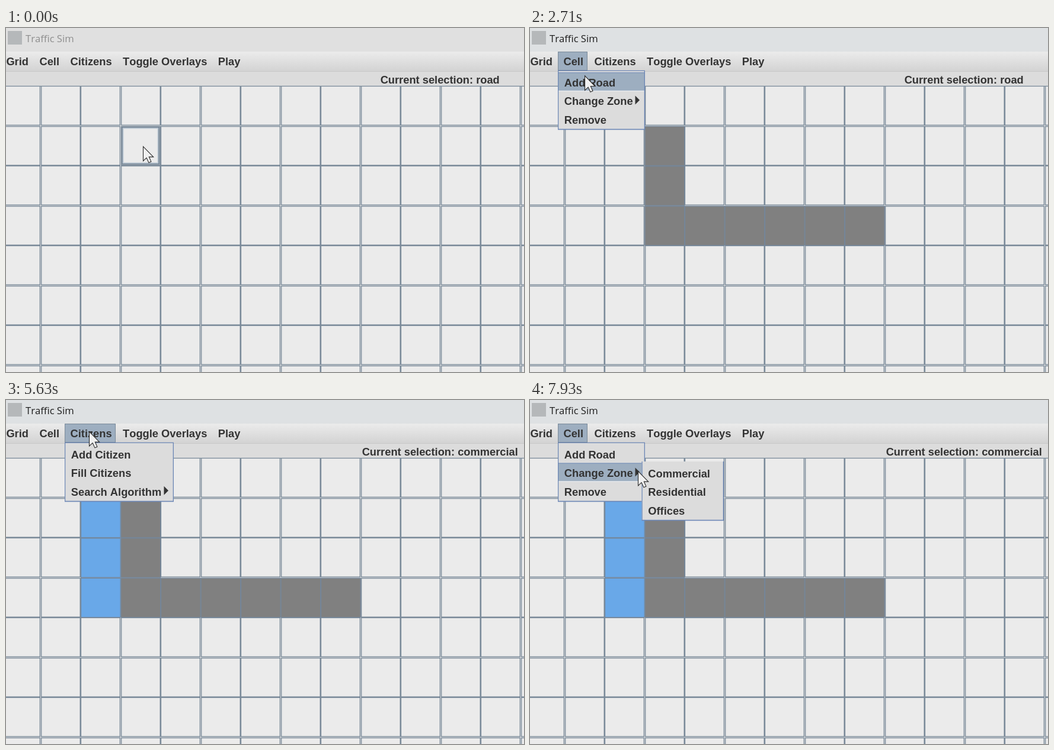
Write an HTML page with a canvas that moves like this. It is 874x582 px and loops after 8 s.

```html
<!DOCTYPE html>
<html lang="en">
<head>
<meta charset="utf-8">
<title>Traffic Sim</title>
<style>
html, body { margin: 0; width: 874px; height: 582px; overflow: hidden; }
canvas { display: block; }
</style>
</head>
<body>
<canvas id="stage" width="874" height="582"></canvas>
<script>
const ctx = document.getElementById('stage').getContext('2d');
const LOOP = 8000, PITCH = 67.5, LEFT = -9.5, TOP = 97.5, ROW = 31.4;
const LINE = '#7a8a99', EMPTY = '#ebebeb', ROAD = '#808080', SHOP = '#69a8e8';
const PANEL = '#dcdcdc', PICKED = '#9daec0', EDGE = '#6b86b5', INK = '#333';
const FOCUS = 200, CHOSEN = 4070;

// Pointer moves: start, end, x, y; it rests in between
const moves = [
  [0, 0, 231, 200], [130, 820, 222, 340], [820, 1570, 541, 338], [1700, 2400, 70, 52],
  [2570, 2710, 92, 80], [2710, 2850, 95, 115], [3110, 3600, 310, 128], [3600, 4000, 237, 118],
  [CHOSEN, 4400, 162, 200], [4400, 4880, 158, 318], [4880, 5030, 157, 290], [5030, 5370, 140, 53],
  [5760, 6000, 230, 155], [6000, 6230, 101, 55], [6500, 7260, 78, 74], [7330, 7930, 182, 120]
];
// Dragging paints every cell the pointer enters
const drags = [{ from: 130, to: 1600, color: ROAD }, { from: 4400, to: 4920, color: SHOP }];

const cellMenu = { x: 47, y: 72, w: 147, head: 50, arrow: 1, items: ['Add Road', 'Change Zone', 'Remove'] };
const citizenMenu = { x: 99, y: 72, w: 184, head: 86, arrow: 2, items: ['Add Citizen', 'Fill Citizens', 'Search Algorithm'] };
const zoneMenu = { x: 188.5, y: 104, w: 138.5, items: ['Commercial', 'Residential', 'Offices'] };
const menus = [[0, null], [2400, cellMenu], [CHOSEN, null], [5630, citizenMenu], [6560, cellMenu]];
const zoneShown = t => t >= 3200 && t < CHOSEN || t >= 7650;

const easeOut = k => Math.sin(k * Math.PI / 2);
const colX = c => PITCH * c + LEFT;
const rowY = r => PITCH * r + TOP;
const cellAt = ([x, y]) => [Math.floor((x - LEFT) / PITCH), Math.floor((y - TOP) / PITCH)];

function pointer(t) {
  let pos = moves[0].slice(2);
  for (const [from, to, x, y] of moves.slice(1)) {
    if (t < from) break;
    const k = easeOut(Math.min(1, (t - from) / (to - from)));
    pos = [pos[0] + (x - pos[0]) * k, pos[1] + (y - pos[1]) * k];
  }
  return pos;
}

const paints = new Map();
for (const { from, to, color } of drags) {
  for (let t = from; t < to; t += 10) {
    const [c, r] = cellAt(pointer(t)), key = c + ',' + r;
    if (!paints.has(key)) paints.set(key, { t, c, r, color });
  }
}

function rect(x, y, w, h, fill) {
  ctx.fillStyle = fill;
  ctx.fillRect(x, y, w, h);
}

function frame(x, y, w, h, color, width) {
  ctx.strokeStyle = color;
  ctx.lineWidth = width;
  ctx.strokeRect(x, y, w, h);
}

function shape(path, fill) {
  ctx.fillStyle = fill;
  ctx.fill(path);
}

function text(s, x, y, color = INK, font = 'bold 18.3px "Liberation Sans", Arial, sans-serif') {
  ctx.font = font;
  ctx.fillStyle = color;
  ctx.fillText(s, x, y);
}

function drawHeader(t) {
  const focused = t >= FOCUS;
  rect(0, 0, 874, 40, focused ? '#dee1e3' : '#e0e0e0');
  rect(3, 5, 24, 23, '#b5b8ba');
  text('Traffic Sim', 33, 24, focused ? '#1c1c1c' : '#8e8e8e', '16.6px "Open Sans", "Noto Sans", sans-serif');
  const shade = ctx.createLinearGradient(0, 40, 0, 73);
  shade.addColorStop(0, '#ebebeb');
  shade.addColorStop(1, '#d3d3d3');
  rect(0, 40, 874, 33, shade);
  rect(0, 73, 874, 1, '#c8c8c8');
  rect(0, 74, 874, 24, PANEL);
  // The label is centred on its own column
  ctx.textAlign = 'center';
  text('Current selection: ' + (t < CHOSEN ? 'road' : 'commercial'), 732.2, 94);
  ctx.textAlign = 'left';
}

function drawGrid() {
  rect(0, 98, 874, 484, EMPTY);
  const gaps = [];
  const edge = (pos, upright) => {
    const bar = (p, w, color) => upright ? rect(p, 98, w, 484, color) : rect(0, p, 874, w, color);
    if (pos % 1) return bar(pos - 1, 2.6, LINE);
    bar(pos - 1.3, 3.6, LINE);
    gaps.push(() => bar(pos + .1, .8, EMPTY));
  };
  for (let c = 1; c < 14; c++) edge(colX(c), true);
  for (let r = 1; r < 8; r++) edge(rowY(r), false);
  gaps.forEach(draw => draw());
  rect(0, 97.8, 874, 1.3, LINE);
}

function drawCells(t, pos, menu) {
  for (const { t: start, c, r, color } of paints.values()) {
    if (t < start) continue;
    const x = colX(c), y = rowY(r);
    rect(x + .5, y + 1, PITCH, PITCH - .5, color);
    frame(x + 1, y + 1.5, 66.7, 66.2, '#74869a', 1.2);
  }
  if (menu || pos[1] < TOP || drags.some(d => t >= d.from && t < d.to)) return;
  const [c, r] = cellAt(pos), x = colX(c), y = rowY(r);
  frame(x + 2.7, y + 2.7, 62.6, 62.6, LINE, 2.4);
  frame(x + 4.6, y + 4.6, 58.8, 58.8, '#b9c6d2', 1.6);
}

function drawPopup({ x, y, w, head, items, arrow }, picked) {
  rect(x, y, w, 100, PANEL);
  items.forEach((item, i) => {
    const top = y + 3.7 + ROW * i;
    if (i === picked) {
      rect(x + 1, top, w - 2, 30.4, PICKED);
      rect(x + 1, top - .6, w - 2, 1, EDGE);
      rect(x + 1, top + 30.2, w - 2, 1.2, '#e9edf1');
    }
    text(item, x + 10.8, y + 27 + ROW * i);
    if (i === arrow) shape(new Path2D(`M${x + w - 16.5} ${top + 7.3}l7.5 7.5l-7.5 7.5z`), INK);
  });
  rect(x, y, 1.2, 100, EDGE);
  rect(x + w - 1.3, y, 1.3, 100, EDGE);
  rect(x, y + 98.7, w, 1.6, EDGE);
  if (head) rect(x, y - .3, w, 1.2, EDGE);
}

function drawMenus(t, [px, py], menu) {
  if (menu) {
    rect(menu.x, 40, menu.head, 32, PICKED);
    frame(menu.x + .5, 40.5, menu.head - 1, 31, LINE, 1);
  }
  let x = .4;
  for (const name of ['Grid', 'Cell', 'Citizens', 'Toggle Overlays', 'Play']) {
    text(name, x, 63);
    x += ctx.measureText(name).width + 18.5;
  }
  if (!menu) return;
  const rowAt = m => Math.floor((py - m.y - 3.7) / ROW);
  const inZone = zoneShown(t) && px >= zoneMenu.x;
  drawPopup(menu, inZone ? 1 : rowAt(menu));
  if (zoneShown(t)) drawPopup(zoneMenu, inZone ? rowAt(zoneMenu) : -1);
}

function drawPointer([x, y]) {
  const arrow = new Path2D(`M${x + .5} ${y + .5}v24.5l5.6 -5.3l3.8 8.2l4 -1.8l-3.6 -8h7.4z`);
  shape(arrow, '#f0f0f0');
  ctx.strokeStyle = '#2a2a2a';
  ctx.lineWidth = 1.1;
  ctx.stroke(arrow);
}

function draw(now) {
  const t = now % LOOP, pos = pointer(t);
  const menu = menus.filter(m => m[0] <= t).pop()[1];
  ctx.fontKerning = 'none';
  drawHeader(t);
  drawGrid();
  drawCells(t, pos, menu);
  drawMenus(t, pos, menu);
  drawPointer(pos);
  requestAnimationFrame(() => draw(performance.now() - start));
}

const start = performance.now();
draw(0);
</script>
</body>
</html>
```
